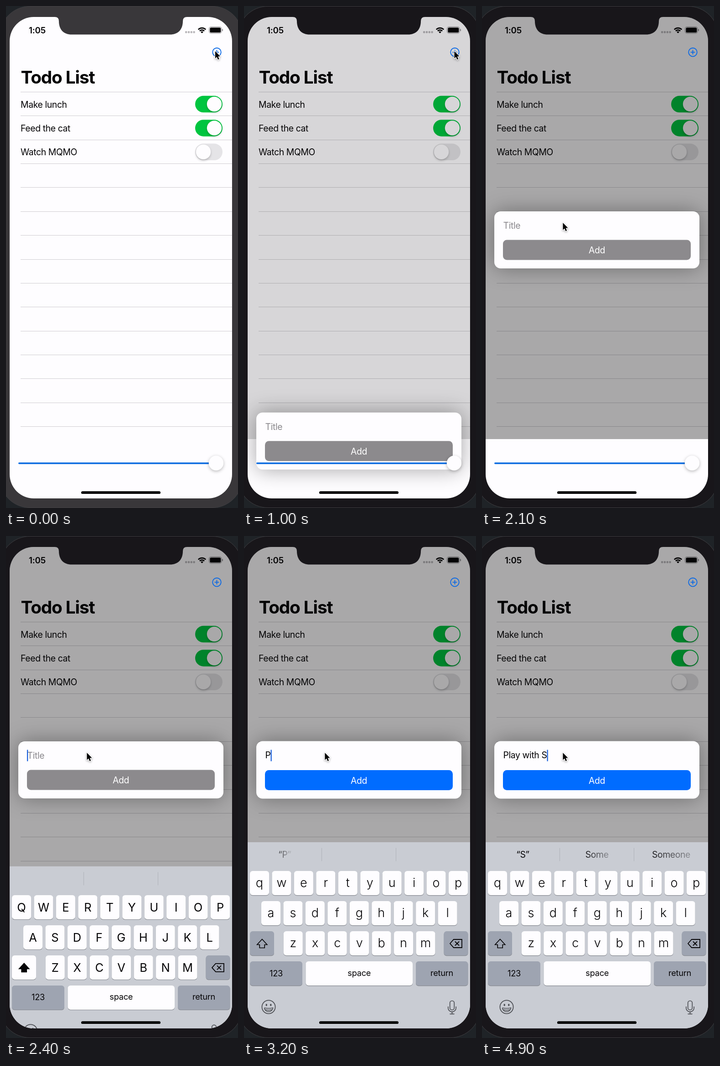
Recreate the animation shown at these times as an HTML page with a canvas. Size 509 px wide and 1100 px high, loop 5000 ms.

```html
<!DOCTYPE html>
<html lang="en">
<head>
<meta charset="utf-8">
<title>Todo List</title>
<style>
html, body { margin: 0; width: 100%; height: 100%; overflow: hidden; background: #1f2327; }
canvas { display: block; width: 509px; height: 1100px; }
</style>
</head>
<body>
<canvas id="stage" width="509" height="1100"></canvas>
<script>
const ctx = document.getElementById('stage').getContext('2d');
const LOOP = 5000, STEP = 100;
const BLUE = '#006cff', INK = '#050406', PAPER = '#fefdff';
const MESSAGE = 'Play with S';
const TYPE_START = 3150, TYPE_GAP = 164;

// Keyboard suggestions after each typed character.
const HINTS = [
  ['“P”', 'Please', 'People'], ['“Pl”', 'Please', 'Plan'], ['“Pla”', 'Play', 'Place'],
  ['“Play”', 'Playing', 'Played'], ['the', 'with', 'a'], ['“w”', 'with', 'we'],
  ['“wi”', 'with', 'will'], ['“wit”', 'with', 'it'], ['“with”', 'with', 'it'],
  ['the', 'my', 'a'], ['“S”', 'Some', 'Someone']
];

const clamp = v => Math.max(0, Math.min(1, v));
const smooth = v => { v = clamp(v); return v * v * (3 - 2 * v); };
const mix = (a, b, p) => a + (b - a) * p;

function box(x, y, w, h, r, fill) {
  ctx.beginPath();
  ctx.roundRect(x, y, w, h, r);
  if (fill) { ctx.fillStyle = fill; ctx.fill(); }
}

function disc(x, y, r, fill) {
  ctx.beginPath();
  ctx.arc(x, y, r, 0, 7);
  ctx.fillStyle = fill;
  ctx.fill();
}

function line(points, color, width = 1, close = false) {
  ctx.beginPath();
  points.forEach(([x, y]) => ctx.lineTo(x, y));
  if (close) ctx.closePath();
  ctx.strokeStyle = color;
  ctx.lineWidth = width;
  ctx.stroke();
}

function arc(x, y, r, from, to, color, width) {
  ctx.beginPath();
  ctx.arc(x, y, r, from, to);
  ctx.strokeStyle = color;
  ctx.lineWidth = width;
  ctx.stroke();
}

function setFont(size, weight = 400, tracking = -0.02) {
  ctx.font = `${weight} ${size}px Inter, sans-serif`;
  ctx.letterSpacing = `${size * tracking}px`;
}

function text(str, x, y, { size = 19.4, weight, tracking, color = INK, align = 'left' } = {}) {
  setFont(size, weight, tracking);
  ctx.textAlign = align;
  ctx.fillStyle = color;
  ctx.fillText(str, x, y);
}

function withShadow(color, blur, dy, draw) {
  ctx.save();
  ctx.shadowColor = color;
  ctx.shadowBlur = blur;
  ctx.shadowOffsetY = dy;
  draw();
  ctx.restore();
}

function screenPath() {
  ctx.beginPath();
  ctx.roundRect(8, 24, 488, 1055, 53);
}

function drawBezel(color) {
  ctx.fillStyle = '#1f2327';
  ctx.fillRect(0, 0, 509, 1100);
  box(-14, 0.5, 533, 1099, 67, color);
  ctx.strokeStyle = '#403f42';
  ctx.lineWidth = 1;
  ctx.stroke();
}

function drawNotch(color) {
  ctx.beginPath();
  ctx.moveTo(107, 23);
  ctx.lineTo(107, 24);
  ctx.quadraticCurveTo(116, 24, 116, 33);
  ctx.bezierCurveTo(116, 52, 127, 62.5, 144, 62.5);
  ctx.lineTo(360, 62.5);
  ctx.bezierCurveTo(377, 62.5, 388, 52, 388, 33);
  ctx.quadraticCurveTo(388, 24, 397, 24);
  ctx.lineTo(397, 23);
  ctx.fillStyle = color;
  ctx.fill();
}

function drawStatus() {
  text('1:05', 50, 60, { size: 18.8, weight: 600, tracking: -0.01 });
  for (let i = 0; i < 4; i++) box(393 + i * 5.8, 55, 4.3, 4.5, 1.5, '#b9b7bb');
  const from = -Math.PI * 0.75, to = -Math.PI * 0.25;
  arc(430, 59.8, 11.6, from, to, INK, 2.7);
  arc(430, 59.8, 7.2, from, to, INK, 2.6);
  ctx.beginPath();
  ctx.moveTo(430, 59.8);
  ctx.arc(430, 59.8, 4.1, from, to);
  ctx.fillStyle = INK;
  ctx.fill();
  box(445.5, 45.5, 27.5, 14.5, 4.2);
  ctx.strokeStyle = '#89878b';
  ctx.lineWidth = 1;
  ctx.stroke();
  box(447.3, 47.3, 24, 11, 2.6, INK);
  box(474.3, 50.5, 1.6, 4.6, 1, '#89878b');
}

function drawToggle(y, on) {
  box(415, y - 18.2, 60, 36.5, 18.2, on ? '#00c540' : '#e5e4e7');
  withShadow('rgba(0,0,0,.22)', 5, 2.5, () => disc(on ? 457 : 433, y, 16.2, PAPER));
}

function drawList() {
  text('Todo List', 32.5, 170, { size: 38.8, weight: 700, tracking: -0.03 });
  for (let i = 0; i < 15; i++) {
    ctx.fillStyle = '#cfcdd1';
    ctx.fillRect(32, Math.round(188 + i * 52.36), 464, 1);
  }
  ['Make lunch', 'Feed the cat', 'Watch MQMO'].forEach((label, i) => {
    const y = 215 + i * 52.36;
    text(label, 32, y + 7.5);
    drawToggle(y, i < 2);
  });
}

function drawPlus() {
  arc(462.5, 101.3, 9.3, 0, 7, '#0868e6', 1.8);
  line([[457.7, 101.3], [467.3, 101.3]], '#0868e6', 1.8);
  line([[462.5, 96.5], [462.5, 106.1]], '#0868e6', 1.8);
}

function drawSheet(y, typed, caret) {
  const filled = typed.length > 0;
  const grow = filled ? 0.6 : 0;
  withShadow('rgba(0,0,0,.36)', 46, 0, () => box(27, y - grow, 450, 125 + 2 * grow, 14, PAPER));
  text(typed || 'Title', 46.5, y + 38 - grow, { color: filled ? INK : '#8a888c' });
  if (caret) {
    const x = filled ? 46.5 + ctx.measureText(typed).width : 46;
    ctx.fillStyle = '#1f63dd';
    ctx.fillRect(x, y + 18.5, 2.3, 25);
  }
  box(46, y + 62.5 + grow, 412, 44, 8.5, filled ? BLUE : '#8c8a8d');
  text('Add', 252, y + 92 + grow, { color: '#fff', align: 'center' });
}

function drawSlider() {
  box(27, 1000.2, 434, 3.6, 1.8, '#0a6be0');
  withShadow('rgba(0,0,0,.28)', 7, 2, () => disc(461, 1001.5, 16.2, PAPER));
}

function key(x, y, w, dark) {
  box(x, y + 1.2, w, 53, 6, '#888b92');
  box(x, y, w, 53, 6, dark ? '#9ea4b1' : PAPER);
}

function drawKeyRow(letters, x, y, upper) {
  [...letters].forEach((ch, i) => {
    const left = x + i * 48.45;
    key(left, y, 42);
    text(upper ? ch.toUpperCase() : ch, left + 21, y + (upper ? 36 : 35),
      { size: upper ? 25.5 : 27, weight: upper ? 400 : 300, tracking: 0, align: 'center' });
  });
}

function drawShift(y, upper) {
  key(13, y, 53, !upper);
  const half = [[11, 12], [5.5, 12], [5.5, 19], [-5.5, 19], [-5.5, 12], [-11, 12], [0, 0]];
  line(half.map(([dx, dy]) => [39.7 + dx, y + 17.5 + dy]), INK, 1.7, true);
  if (upper) { ctx.fillStyle = INK; ctx.fill(); }
}

function drawDelete(y) {
  key(438.5, y, 53, true);
  const cy = y + 27;
  line([[452, cy], [460, cy - 9], [478, cy - 9], [478, cy + 9], [460, cy + 9]], INK, 1.8, true);
  line([[463, cy - 4.5], [472, cy + 4.5]], INK, 1.8);
  line([[472, cy - 4.5], [463, cy + 4.5]], INK, 1.8);
}

function drawSmiley(x, y) {
  const ink = '#4c4e53';
  arc(x, y, 14.6, 0, 7, ink, 1.8);
  for (const side of [-1, 1]) {
    ctx.beginPath();
    ctx.ellipse(x + side * 4.8, y - 4.5, 1.7, 2.6, 0, 0, 7);
    ctx.fillStyle = ink;
    ctx.fill();
  }
  ctx.beginPath();
  ctx.moveTo(x - 9.5, y + 2);
  ctx.quadraticCurveTo(x, y + 4, x + 9.5, y + 2);
  ctx.bezierCurveTo(x + 8, y + 13, x - 8, y + 13, x - 9.5, y + 2);
  ctx.strokeStyle = ink;
  ctx.lineWidth = 1.6;
  ctx.stroke();
  line([[x - 8, y + 6], [x, y + 7], [x + 8, y + 6]], ink, 1.3);
}

function drawMic(x, y) {
  const ink = '#4c4e53';
  box(x - 4.8, y - 14.5, 9.6, 20, 4.8);
  ctx.strokeStyle = ink;
  ctx.lineWidth = 1.7;
  ctx.stroke();
  ctx.beginPath();
  ctx.moveTo(x - 8.7, y - 2);
  ctx.lineTo(x - 8.7, y + 1);
  ctx.arc(x, y + 1, 8.7, Math.PI, 0, true);
  ctx.lineTo(x + 8.7, y - 2);
  ctx.stroke();
  line([[x, y + 9.7], [x, y + 14]], ink, 1.7);
  line([[x - 5, y + 14.3], [x + 5, y + 14.3]], ink, 1.7);
}

function drawHints(y, hints, age) {
  for (const x of [170, 333]) {
    ctx.fillStyle = '#b0b3ba';
    ctx.fillRect(x, y + 12.5, 1, 29);
  }
  hints.forEach((word, i) => {
    const center = 89.5 + i * 162.7, lag = i ? 50 : 0;
    setFont(19.4);
    const half = ctx.measureText(word).width / 2;
    const shade = ctx.createLinearGradient(center - half, 0, center + half, 0);
    shade.addColorStop(0, `rgba(5,4,6,${clamp((age - lag - 15) / 50)})`);
    shade.addColorStop(1, `rgba(5,4,6,${clamp((age - lag - 45) / 50)})`);
    text(word, center, y + 34, { color: shade, align: 'center' });
  });
}

function drawKeyboard(y, count, age) {
  const upper = count === 0;
  ctx.fillStyle = '#c9ccd3';
  ctx.fillRect(8, y, 488, 420);
  drawHints(y, HINTS[count - 1] || [], age);
  drawKeyRow('qwertyuiop', 13, y + 63, upper);
  drawKeyRow('asdfghjkl', 38, y + 129, upper);
  drawKeyRow('zxcvbnm', 86.8, y + 195, upper);
  drawShift(y + 195, upper);
  drawDelete(y + 195);
  const label = { size: 18.2, tracking: -0.015, align: 'center' };
  key(13, y + 261, 115, true);
  key(135.5, y + 261, 234.5);
  key(377, y + 261, 114.5, true);
  text('123', 70.5, y + 293.5, label);
  text('space', 252.7, y + 292.5, label);
  text('return', 434, y + 292.5, label);
  drawSmiley(54, y + 361);
  drawMic(456.5, y + 362);
}

function drawCursor(x, y) {
  ctx.save();
  ctx.translate(x, y);
  ctx.beginPath();
  [[0, 0], [0, 15.8], [3.6, 12.5], [6, 18.3], [8.7, 17.2], [6.3, 11.5], [11, 11.3]]
    .forEach(([px, py]) => ctx.lineTo(px, py));
  ctx.closePath();
  ctx.lineJoin = 'round';
  ctx.lineWidth = 2.4;
  ctx.strokeStyle = '#fff';
  withShadow('rgba(0,0,0,.35)', 4, 1.5, () => ctx.stroke());
  ctx.fillStyle = '#000';
  ctx.fill();
  ctx.restore();
}

function drawScene(t) {
  const active = t >= 200;
  const bezel = active ? '#18161a' : '#39373a';
  const open = smooth((t - 850) / 320);
  const count = t < TYPE_START ? 0
    : Math.min(MESSAGE.length, 1 + Math.floor((t - TYPE_START) / TYPE_GAP));
  const age = t - TYPE_START - (count - 1) * TYPE_GAP;
  const focused = t >= 2300;
  const caret = focused && (t < 2850 || count > 0);

  drawBezel(bezel);
  ctx.save();
  screenPath();
  ctx.clip();
  ctx.fillStyle = PAPER;
  ctx.fillRect(8, 24, 488, 1056);
  drawStatus();
  drawList();
  ctx.fillStyle = `rgba(0,0,0,${0.338 * open})`;
  ctx.fillRect(8, 24, 488, 925);
  drawPlus();
  if (open > 0) drawSheet(mix(1256, 450, open), MESSAGE.slice(0, count), caret);
  drawSlider();
  if (focused) {
    // Critically damped spring.
    const w = 18.26 * (t - 2205) / 1000;
    drawKeyboard(671 + 408 * (1 + w) * Math.exp(-w), count, age);
  }
  box(165, 1063.3, 174, 5.8, 2.9, '#000');
  ctx.restore();
  drawNotch(bezel);

  const travel = smooth((t - 1250) / 550);
  drawCursor(mix(active ? 461.5 : 459, 177.5, travel), mix(99, 475, travel));
}

function tick(now) {
  const t = now % LOOP;
  ctx.clearRect(0, 0, 509, 1100);
  drawScene(Math.floor(t / STEP) * STEP);
  requestAnimationFrame(tick);
}

drawScene(0);
requestAnimationFrame(() => tick(performance.now()));
</script>
</body>
</html>
```
